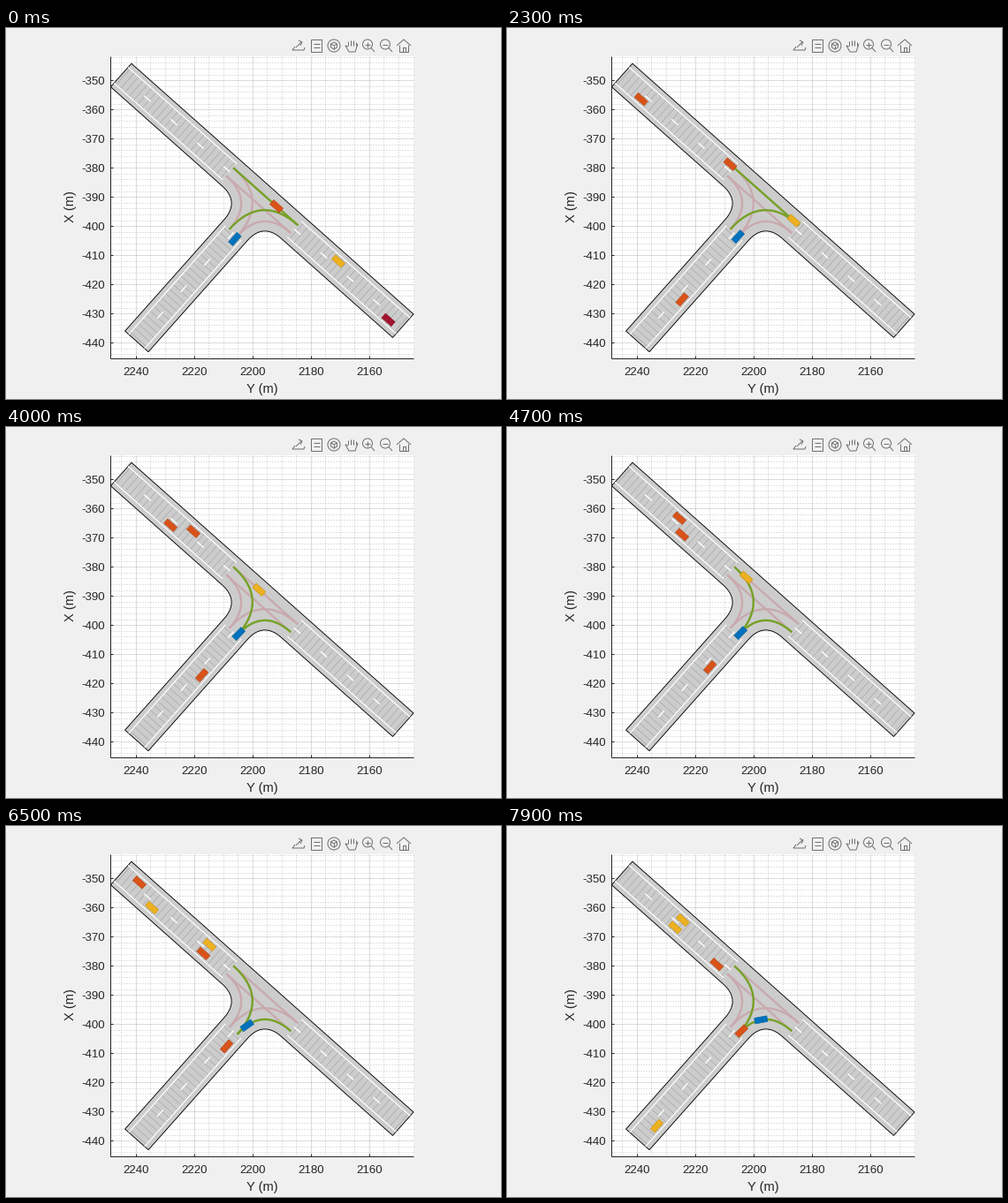
These frames come from a looping animation (560x420 px, 8000 ms). A matplotlib script:

```python
import numpy as np
import matplotlib.pyplot as plt
from matplotlib.animation import FuncAnimation
from matplotlib.collections import LineCollection
from matplotlib.colors import to_rgb
from matplotlib.patches import Circle, PathPatch, Polygon, Rectangle
from matplotlib.path import Path

W, H, DPI = 560, 420, 100
STEP, FRAMES = 100, 80
PX = 72 / DPI  # one pixel in points

INK, GRAY = "#262626", "#707070"
BLUE, ORANGE, YELLOW, RED = "#0072bd", "#d95319", "#edb120", "#a2142f"
GREEN, PINK = "#74a324", "#c9a9ad"

LEFT, RIGHT, TOP, BOTTOM = 117.8, 461.2, 32, 374.2
SCALE = 3.3  # pixels per metre

# T-junction: a runs along the main road, b away from the side road
ORIGIN = np.array([289.7, 195.3])
ANGLE = np.radians(41.64)
E = np.array([np.cos(ANGLE), np.sin(ANGLE)])
N = np.array([np.sin(ANGLE), -np.cos(ANGLE)])
ARM, HALF, BORDER, LANE = 213.5, 17.7, 12, 6
MOUTH, FILLET = 49, 45
SWITCH = 2.5  # seconds until the right of way changes

fig = plt.figure(figsize=(W / DPI, H / DPI), dpi=DPI, facecolor="#f0f0f0")
ax = fig.add_axes([0, 0, 1, 1])
ax.set_xlim(0, W)
ax.set_ylim(H, 0)
ax.axis("off")


def world(points):
    p = np.asarray(points, float)
    return ORIGIN + p[..., :1] * E + p[..., 1:] * N


def lines(segments, color, width=1, z=1, **kw):
    ax.add_collection(LineCollection(segments, colors=[color],
                                     linewidths=width * PX, zorder=z, **kw))


def bend(start, corner, end, n=40):
    """Points of a quadratic curve that rounds a corner."""
    q = np.linspace(0, 1, n)[:, None]
    start, corner, end = map(np.array, (start, corner, end))
    return (1 - q) ** 2 * start + 2 * q * (1 - q) * corner + q * q * end


def x_px(y_m):
    return 146.8 + (2240 - y_m) * SCALE


def y_px(x_m):
    return 59.2 - (x_m + 350) * SCALE


def draw_axes():
    ax.add_patch(Rectangle((LEFT, TOP), RIGHT - LEFT, BOTTOM - TOP,
                           fc="white", ec="none", zorder=0))
    col = lambda v: [(v, TOP), (v, BOTTOM)]
    row = lambda v: [(LEFT, v), (RIGHT, v)]
    xs, ys = range(2240, 2159, -20), range(-350, -441, -10)

    minor = [col(x_px(v)) for v in range(2245, 2145, -5) if v % 20]
    minor += [row(y_px(v)) for v in range(-342, -446, -2) if v % 10]
    lines(minor, (.1, .1, .1, .25), linestyles=[(0, (1, 2))])
    lines([col(x_px(v)) for v in xs] + [row(y_px(v)) for v in ys],
          (.1, .1, .1, .15))

    ticks = [[(x_px(v), BOTTOM), (x_px(v), BOTTOM - 3.5)] for v in xs]
    ticks += [[(LEFT, y_px(v)), (LEFT + 3.5, y_px(v))] for v in ys]
    lines(ticks + [col(LEFT), row(BOTTOM)], INK, z=2)

    font = dict(family="Liberation Sans", color=INK)
    for v in xs:
        ax.text(x_px(v) + .5, 393, str(v), size=13.3 * PX, ha="center", **font)
    for v in ys:
        ax.text(112.5, y_px(v) + 5, str(v), size=13.3 * PX, ha="right", **font)
    ax.text(290, 413, "Y (m)", size=14.6 * PX, ha="center", **font)
    ax.text(73, 202, "X (m)", size=14.6 * PX, ha="center", va="center",
            rotation=90, **font)


def draw_arm(axis):
    """Lane borders, cross lines and centre dashes from the arm's end inwards."""
    axis = np.array(axis)
    side = axis[::-1]
    at = lambda s, k: world(axis * (ARM - s) + side * k)
    reach = ARM - MOUTH
    lines([[at(s, -BORDER), at(s, BORDER)] for s in np.arange(3, reach, 6.6)],
          "#adadad", .8, 4)
    lines([[at(0, k), at(reach, k)] for k in (-BORDER, BORDER)], "white", 1.2, 5)
    lines([[at(s, 0), at(s + 10, 0)] for s in np.arange(35, reach - 8, 40)],
          "white", 1.4, 5)


def draw_road():
    fillet = bend((HALF, -FILLET), (HALF, -HALF), (FILLET, -HALF))
    right = np.vstack([(HALF, -ARM), fillet, (ARM, -HALF), (ARM, HALF)])
    outline = np.vstack([right, right[::-1] * (-1, 1)])
    ax.add_patch(Polygon(world(outline), fc="#cccccc", ec="black", lw=.9 * PX,
                         zorder=3))
    for axis in ((-1, 0), (1, 0), (0, -1)):
        draw_arm(axis)


def draw_toolbar():
    def stroke(cx, *polylines):
        lines([np.add(p, (cx, 20)) for p in polylines], GRAY)

    def ring(cx, cy, r):
        ax.add_patch(Circle((cx, cy), r, fc="none", ec=GRAY, lw=PX))

    stroke(331, [(-4, 1), (-7, 5), (6, 5), (7, 2)], [(-3, 2), (3, -4)],
           [(0, -6), (4, -4), (2, 0)])

    ax.add_patch(Rectangle((345, 13), 12, 14, fc="none", ec=GRAY, lw=PX))
    stroke(351, *[[(-3, y), (4, y)] for y in (-2, 2)])

    ring(371, 20, 7)
    turn = np.radians(np.arange(30, 391, 60))
    cube = 4 * np.column_stack([np.cos(turn), np.sin(turn)])
    stroke(371, cube, *[[(0, 0), p] for p in cube[1::2]])

    stroke(391, [(-4, 1), (-7, 0), (-3, 7), (4, 7), (7, -2)],
           *[[(x, 0), (x, abs(x) / 2 - 7)] for x in (-4, -1, 2, 5)])

    for cx in (410, 430):
        ring(cx - 1, 18.5, 5.5)
        stroke(cx, [(3, 2.5), (7, 7)], [(-4, -1.5), (2, -1.5)])
    stroke(410, [(-1, -4.5), (-1, 1.5)])
    stroke(450, [(-8, 0), (0, -7), (8, 0)], [(-5, -1), (-5, 7), (5, 7), (5, -1)],
           [(-1, 7), (-1, 2), (2, 2), (2, 7)])


class Car:
    """Drives along a route; `acc` acts for `ramp` seconds after `wait`."""

    def __init__(self, color, route, start, s, v, acc=0, wait=0, ramp=99):
        self.points = world(route)
        gaps = np.hypot(*np.diff(self.points, axis=0).T)
        self.dist = np.append(0, np.cumsum(gaps))
        self.start, self.s, self.v = start, s, v
        self.acc, self.wait, self.ramp = acc, wait, ramp
        rgb = np.array(to_rgb(color))
        self.patch = ax.add_patch(Polygon(np.zeros((4, 2)), fc=rgb, ec=rgb * .85,
                                          lw=.6 * PX, zorder=9))

    def travelled(self, t):
        since = max(t - self.wait, 0)
        push = min(since, self.ramp)
        return self.s + self.v * t + self.acc * push * (since - push / 2)

    def at(self, s):
        return np.array([np.interp(s, self.dist, c) for c in self.points.T])

    def show(self, t):
        s = self.travelled(t - self.start)
        shown = t >= self.start and s < self.dist[-1] - 4
        self.patch.set_visible(bool(shown))
        if shown:
            u = self.at(s + 3) - self.at(s - 3)
            u /= np.hypot(*u)
            n = np.array([-u[1], u[0]])
            self.patch.set_xy([self.at(s) + 7.2 * i * u + 3.3 * j * n
                               for i, j in ((1, 1), (1, -1), (-1, -1), (-1, 1))])


draw_axes()
draw_road()
draw_toolbar()

# lane ends at the junction's mouths
west_in, west_out = (-MOUTH, -LANE), (-MOUTH, LANE)
east_in, east_out = (MOUTH, LANE), (MOUTH, -LANE)
side_in, side_out = (LANE, -MOUTH), (-LANE, -MOUTH)

right_turn = bend(side_in, (LANE, -LANE), east_out)
before = [bend(east_in, (0, LANE), west_out),
          bend(east_in, (-LANE, LANE), side_out)]
after = [bend(side_in, (LANE, LANE), west_out), right_turn]
closed = [bend(west_in, (0, -LANE), east_out),
          bend(west_in, (-LANE, -LANE), side_out)]


def draw_links(links, color, z):
    return [ax.plot(*world(p).T, color=color, lw=2.3 * PX, zorder=z,
                    solid_capstyle="butt")[0] for p in links]


draw_links(before + after + closed, PINK, 6)
phases = [draw_links(before, GREEN, 7), draw_links(after, GREEN, 7)]

# routes begin at the end of an arm and run a little past the far end
END = ARM + 9
eastward = [(-ARM, -LANE), (END, -LANE)]
westward = [(ARM, LANE), (-END, LANE)]
from_side = np.vstack([(LANE, -ARM), right_turn, (END, -LANE)])

cars = [
    Car(RED, eastward, 0, 410, 32),
    Car(ORANGE, westward, 0, 197, 30.7, acc=.38),
    Car(YELLOW, westward, 0, 103.4, 30),
    Car(BLUE, from_side, 0, 160.4, 1.6, acc=3.3, wait=4.2),
    Car(ORANGE, from_side, .2, 14.2, 29, acc=-2.8, ramp=4.4),
    Car(ORANGE, eastward, 1.4, 5.9, 33, acc=-3.4),
    Car(YELLOW, eastward, 5, 10.2, 29.8, acc=-2.6),
    Car(YELLOW, from_side, 7.4, 11.4, 29),
]


def draw(i):
    t = i * STEP / 1000
    for k, links in enumerate(phases):
        for link in links:
            link.set_visible((t >= SWITCH) == bool(k))
    for car in cars:
        car.show(t)
    return []


anim = FuncAnimation(fig, draw, frames=FRAMES, interval=STEP,
                     repeat=True, repeat_delay=0)
plt.show()
```
